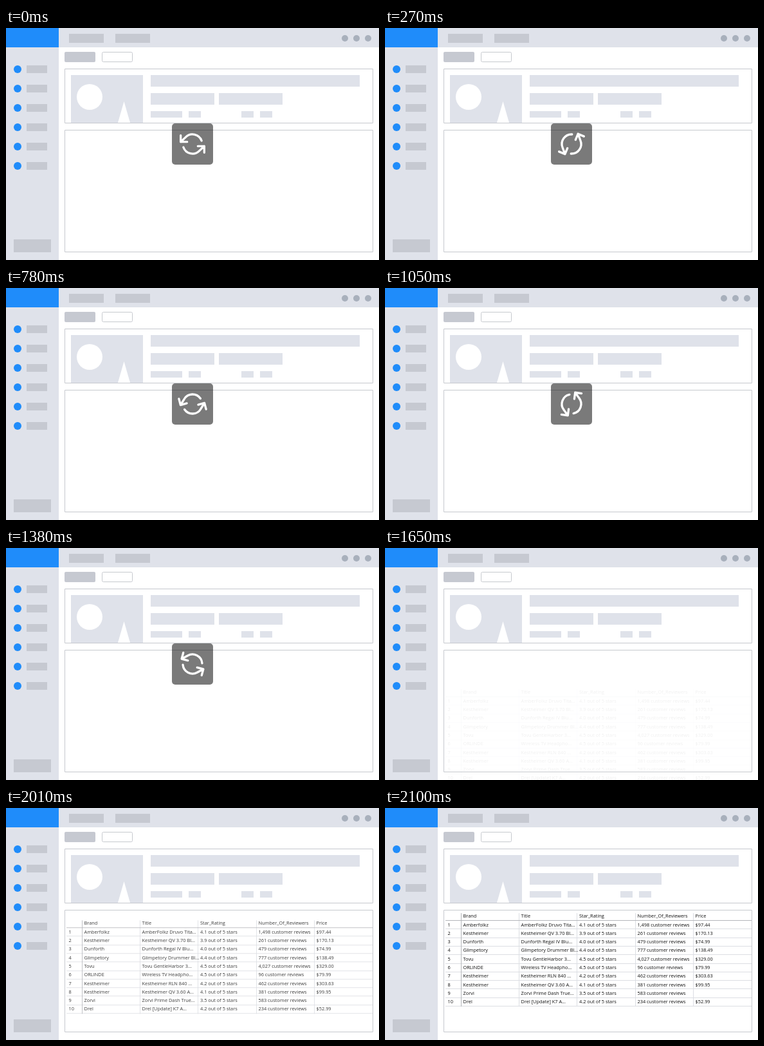
Recreate the animation shown at these times as an HTML page with a canvas. Size 580 by 360 pixels, loop 2410 ms.

```html
<!DOCTYPE html>
<html lang="en">
<head>
<meta charset="utf-8">
<title>Loading a product table</title>
<style>
html, body { margin: 0; width: 100%; height: 100%; overflow: hidden; background: #fff; }
canvas { display: block; width: 580px; height: 360px; }
</style>
</head>
<body>
<canvas id="stage" width="580" height="360"></canvas>
<script>
const ctx = document.getElementById('stage').getContext('2d');

const LOOP = 2410, STEP = 30, TABLE_START = 1620, TABLE_END = 2100;
const SPIN = -0.25; // degrees per ms
const RISE = 60;
const BLUE = '#1f8cfa', PALE = '#dfe2ea', GREY = '#c6c9d1', EDGE = '#c6c9ce', DOT = '#a8b0bc';

const COLS = [97.5, 121.5, 211.5, 302, 392.5, 482.5];
const HEAD = ['', 'Brand', 'Title', 'Star_Rating', 'Number_Of_Reviewers', 'Price'];
const ITEMS = [
  ['Amberfolkz', 'AmberFolkz Druvo Tita...', '4.1', '1,498', '$97.44'],
  ['Kestheimer', 'Kestheimer QV 3.70 Bl...', '3.9', '261', '$170.13'],
  ['Dunforth', 'Dunforth Regal IV Blu...', '4.0', '479', '$74.99'],
  ['Glimpetory', 'Glimpetory Drummer Bl...', '4.4', '777', '$138.49'],
  ['Tovu', 'Tovu GentleHarbor 3...', '4.5', '4,027', '$329.00'],
  ['ORLINDE', 'Wireless TV Headpho...', '4.5', '96', '$79.99'],
  ['Kestheimer', 'Kestheimer RLN 840 ...', '4.2', '462', '$303.63'],
  ['Kestheimer', 'Kestheimer QV 3.60 A...', '4.1', '381', '$99.95'],
  ['Zorvi', 'Zorvi Prime Dash True...', '3.5', '583', ''],
  ['Drel', 'Drel [Update] K7 A...', '4.2', '234', '$52.99']
];
const ROWS = ITEMS.map(([brand, title, stars, count, price], i) =>
  [String(i + 1), brand, title, stars + ' out of 5 stars', count + ' customer reviews', price]);

const ARROWS = new Path2D('M1 4V10H7M23 20V14H17M20.49 9A9 9 0 0 0 5.64 5.64L1 10' +
  'M23 14L18.36 18.36A9 9 0 0 1 3.51 15');

function box(x, y, w, h, color) {
  ctx.fillStyle = color;
  ctx.fillRect(x, y, w, h);
}

function disc(x, y, r, color) {
  ctx.fillStyle = color;
  ctx.beginPath();
  ctx.arc(x, y, r, 0, Math.PI * 2);
  ctx.fill();
}

function roundBox(x, y, w, h, r) {
  ctx.beginPath();
  ctx.roundRect(x, y, w, h, r);
}

function frame(x, y, w, h, r = 0) {
  ctx.strokeStyle = EDGE;
  ctx.lineWidth = 1;
  roundBox(x + 0.5, y + 0.5, w - 1, h - 1, r);
  ctx.stroke();
}

function drawPage() {
  box(0, 0, 580, 360, '#fff');
  box(0, 0, 580, 30, PALE);
  box(0, 30, 82, 330, PALE);
  box(0, 0, 82, 30, BLUE);
  box(98, 9, 54, 14, GREY);
  box(170, 9, 54, 14, GREY);
  for (let i = 0; i < 3; i++) disc(527 + 18 * i, 16, 5, DOT);

  for (let i = 0; i < 6; i++) {
    disc(18, 64 + 30 * i, 6, BLUE);
    box(32, 58 + 30 * i, 32, 12, GREY);
  }
  box(12, 328, 58, 20, GREY);

  ctx.fillStyle = GREY;
  roundBox(91, 37, 48, 16, 2);
  ctx.fill();
  frame(149, 37, 48, 16, 2);

  frame(91, 63, 480, 85);
  box(101, 73, 112, 74, PALE);
  disc(130, 107, 20, '#fff');
  ctx.beginPath();
  ctx.moveTo(183.5, 114);
  ctx.lineTo(193, 147);
  ctx.lineTo(174, 147);
  ctx.fill();
  box(225, 73, 325, 18, PALE);
  box(225, 101, 99, 18, PALE);
  box(331, 101, 99, 18, PALE);
  for (const [x, w] of [[225, 49], [284, 19], [366, 19], [395, 19]]) box(x, 129, w, 10, PALE);

  frame(91, 158, 480, 190);
}

function drawSpinner(t) {
  ctx.fillStyle = 'rgba(0,0,0,0.52)';
  roundBox(258, 148, 64, 64, 5);
  ctx.fill();
  ctx.save();
  ctx.translate(290, 180);
  ctx.rotate(t * SPIN * Math.PI / 180);
  ctx.scale(5 / 3, 5 / 3);
  ctx.translate(-12, -12);
  ctx.strokeStyle = '#fff';
  ctx.lineWidth = 2;
  ctx.lineCap = ctx.lineJoin = 'round';
  ctx.stroke(ARROWS);
  ctx.restore();
}

function drawRow(cells, y) {
  cells.forEach((text, i) => ctx.fillText(text, COLS[i], y));
}

function drawTable(p) {
  ctx.save();
  ctx.globalAlpha = p;
  ctx.translate(0, RISE * (1 - p));
  ROWS.forEach((_, i) => box(94, Math.round(174 + 13.3 * (i + 1)), 476, 1, '#dcdee3'));
  for (const x of [208, 298, 389, 479]) box(x, 163, 1, 145, '#dcdee3');
  box(118, 163, 1, 145, '#b4b6ba');
  box(94, 174, 476, 1, '#b4b6ba');
  ctx.font = '7.4px "Open Sans", "Noto Sans", sans-serif';
  ctx.textBaseline = 'alphabetic';
  ctx.fillStyle = '#111';
  drawRow(HEAD, 169.8);
  ROWS.forEach((row, i) => drawRow(row, 183.6 + 13.28 * i));
  ctx.restore();
}

function render(now) {
  const t = Math.floor((now % LOOP) / STEP) * STEP;
  drawPage();
  if (t < TABLE_START) drawSpinner(t);
  else drawTable(Math.min(1, (t - TABLE_START) / (TABLE_END - TABLE_START)));
}

const start = performance.now();
function tick() {
  render(performance.now() - start);
  requestAnimationFrame(tick);
}
tick();
</script>
</body>
</html>
```
